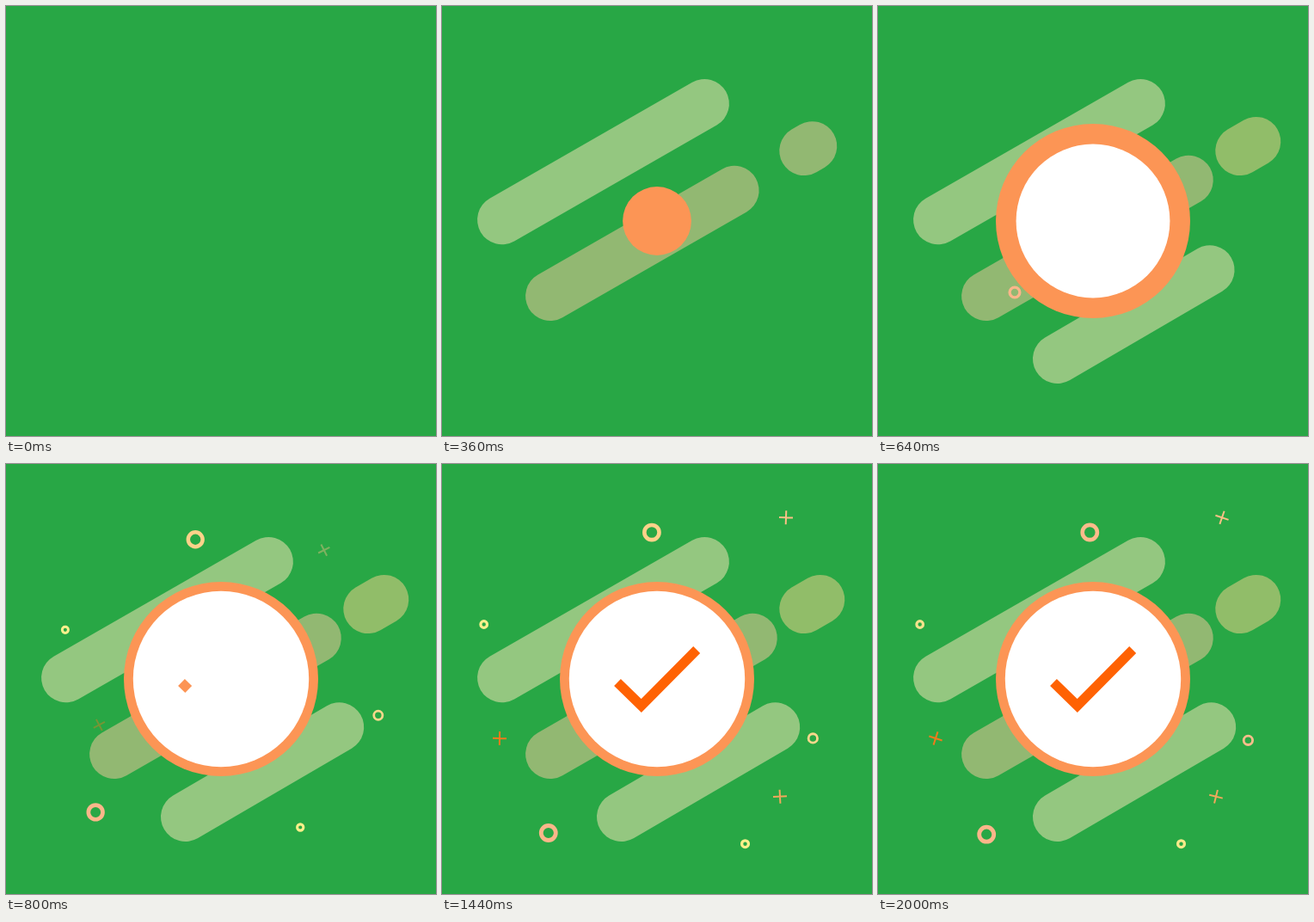
Write an HTML page with a canvas that moves like this. It is 500 px wide and 500 px high and loops after 2240 ms.

```html
<!DOCTYPE html>
<html lang="en">
<head>
<meta charset="utf-8">
<title>Success check</title>
<style>
  html, body { margin: 0; width: 100%; height: 100%; overflow: hidden; background: #28a745; }
  canvas { display: block; width: 100vw; height: 100vh; }
</style>
</head>
<body>
<canvas id="stage" width="500" height="500"></canvas>
<script>
const ctx = document.getElementById('stage').getContext('2d');
const LOOP = 2240, STEP = 40, LAST = 2000;
const CENTER = 250, RAD = Math.PI / 180;
const GREEN = [40, 167, 69], ORANGE = [252, 149, 85], DEEP = [255, 98, 3];

// Slanted bars: tail, head, colour, start time
const bars = [
  { from: [69.8, 248.6], to: [305.2, 113.6], color: [148, 199, 128], start: 36 },
  { from: [125.8, 337.4], to: [361.1, 202.4], color: [146, 184, 114], start: 184 },
  { from: [421, 168.4], to: [439.6, 157.6], color: [145, 189, 105], early: [146, 184, 114], start: 292 },
  { from: [208.7, 410.3], to: [387.5, 306], color: [148, 199, 128], start: 388 }
];

// Rings: final place, radius, line width, colour, late colour, start, orbit in degrees
const rings = [
  { at: [246.3, 79.5], r: 8.6, w: 4.6, color: [253, 210, 138], late: [253, 187, 139], start: 560, orbit: 15 },
  { at: [48.7, 186.5], r: 3.8, w: 3.2, color: [253, 240, 140], late: [245, 226, 140], start: 611, orbit: 0 },
  { at: [430.4, 321.3], r: 5.2, w: 2.8, color: [248, 216, 140], late: [253, 190, 140], start: 560, orbit: 14 },
  { at: [126.2, 430.7], r: 8.5, w: 4.8, color: [251, 182, 138], late: [251, 182, 138], start: 555, orbit: -14.5, },
  { at: [352.5, 441.7], r: 3.9, w: 3.3, color: [253, 240, 138], late: [250, 234, 138], start: 611, orbit: 0 }
];
rings[2].orbit = -14;

const crosses = [
  { at: [400, 62.3], color: [251, 192, 134], start: 654, tilt: 0 },
  { at: [67, 319], color: [240, 122, 28], start: 662, tilt: -1 },
  { at: [393, 386.7], color: [240, 168, 92], start: 740, tilt: -5 }
];
const spin = [[640, -33], [800, -27], [1120, -15], [1440, 2], [2000, 19]];

const clamp = x => Math.max(0, Math.min(1, x));
const part = (t, start, dur) => clamp((t - start) / dur);
const easeOut = x => 1 - (1 - x) ** 3;
const easeInOut = x => x * x * (3 - 2 * x);
const mix = (a, b, k) => a + (b - a) * k;
const blend = (a, b, k) => a.map((v, i) => mix(v, b[i], k));
const rgb = c => `rgb(${c.map(Math.round)})`;

function track(keys, t) {
  const i = Math.max(1, keys.findIndex(k => k[0] >= t));
  const [t0, a] = keys[i - 1], [t1, b] = keys[i];
  return mix(a, b, clamp((t - t0) / (t1 - t0)));
}

function disc(r, color) {
  if (r <= 0) return;
  ctx.fillStyle = color;
  ctx.beginPath();
  ctx.arc(CENTER, CENTER, r, 0, 2 * Math.PI);
  ctx.fill();
}

function drawBar(bar, t) {
  if (t < bar.start) return;
  const head = blend(bar.from, bar.to, easeOut(part(t, bar.start, 319)));
  const color = bar.early ? blend(bar.early, bar.color, part(t, 360, 120)) : bar.color;
  ctx.strokeStyle = rgb(color);
  ctx.lineWidth = 57.4;
  ctx.lineCap = 'round';
  ctx.beginPath();
  ctx.moveTo(...bar.from);
  ctx.lineTo(...head);
  ctx.stroke();
  ctx.lineCap = 'butt';
}

// Place on the way out from the centre, turned back by some degrees
function flight(at, k, turn) {
  const dx = at[0] - CENTER, dy = at[1] - CENTER;
  const dist = Math.hypot(dx, dy) * k;
  const angle = Math.atan2(dy, dx) - turn * RAD;
  return [CENTER + dist * Math.cos(angle), CENTER + dist * Math.sin(angle)];
}

function drawRing(ring, t) {
  if (t <= ring.start) return;
  const k = easeOut(part(t, ring.start, 353));
  const left = 1 - part(t, 600, 1400);
  const [x, y] = flight(ring.at, k, ring.orbit * left ** 3.2 * (ring === rings[2] ? -1 : 1));
  const size = mix(0.3, 1, k);
  ctx.strokeStyle = rgb(blend(ring.color, ring.late, part(t, 1440, 560)));
  ctx.lineWidth = ring.w * size;
  ctx.beginPath();
  ctx.arc(x, y, ring.r * size, 0, 2 * Math.PI);
  ctx.stroke();
}

function drawCross(cross, t) {
  const x = part(t, cross.start, 353);
  if (!x) return;
  const half = mix(7, 8, x);
  ctx.save();
  ctx.translate(...flight(cross.at, easeOut(x), 0));
  ctx.rotate((track(spin, t) + cross.tilt) * RAD);
  ctx.strokeStyle = rgb(blend(GREEN, cross.color, x));
  ctx.lineWidth = 2;
  ctx.beginPath();
  ctx.moveTo(-half, 0);
  ctx.lineTo(half, 0);
  ctx.moveTo(0, -half);
  ctx.lineTo(0, half);
  ctx.stroke();
  ctx.restore();
}

function drawCheck(t) {
  const k = easeInOut(part(t, 714, 470));
  if (!k) return;
  const a = [204, 254], b = [231.8, 281], c = [296.2, 216];
  const first = Math.hypot(b[0] - a[0], b[1] - a[1]);
  const second = Math.hypot(c[0] - b[0], c[1] - b[1]);
  const len = k * (first + second);
  ctx.strokeStyle = rgb(blend(ORANGE, DEEP, clamp((k - 0.08) / 0.8)));
  ctx.lineWidth = 11.2;
  ctx.beginPath();
  ctx.moveTo(...a);
  ctx.lineTo(...blend(a, b, clamp(len / first)));
  if (len > first) ctx.lineTo(...blend(b, c, (len - first) / second));
  ctx.stroke();
}

function draw(t) {
  ctx.fillStyle = rgb(GREEN);
  ctx.fillRect(0, 0, 500, 500);
  bars.forEach(bar => drawBar(bar, t));
  rings.forEach(ring => drawRing(ring, t));
  crosses.forEach(cross => drawCross(cross, t));
  disc(113 * easeOut(part(t, 320, 296)), rgb(ORANGE));
  disc(102.2 * easeOut(part(t, 500, 280)), '#fff');
  drawCheck(t);
}

const begin = performance.now();
function tick() {
  const t = (performance.now() - begin) % LOOP;
  draw(Math.min(LAST, Math.floor(t / STEP) * STEP));
  requestAnimationFrame(tick);
}
tick();
</script>
</body>
</html>
```
